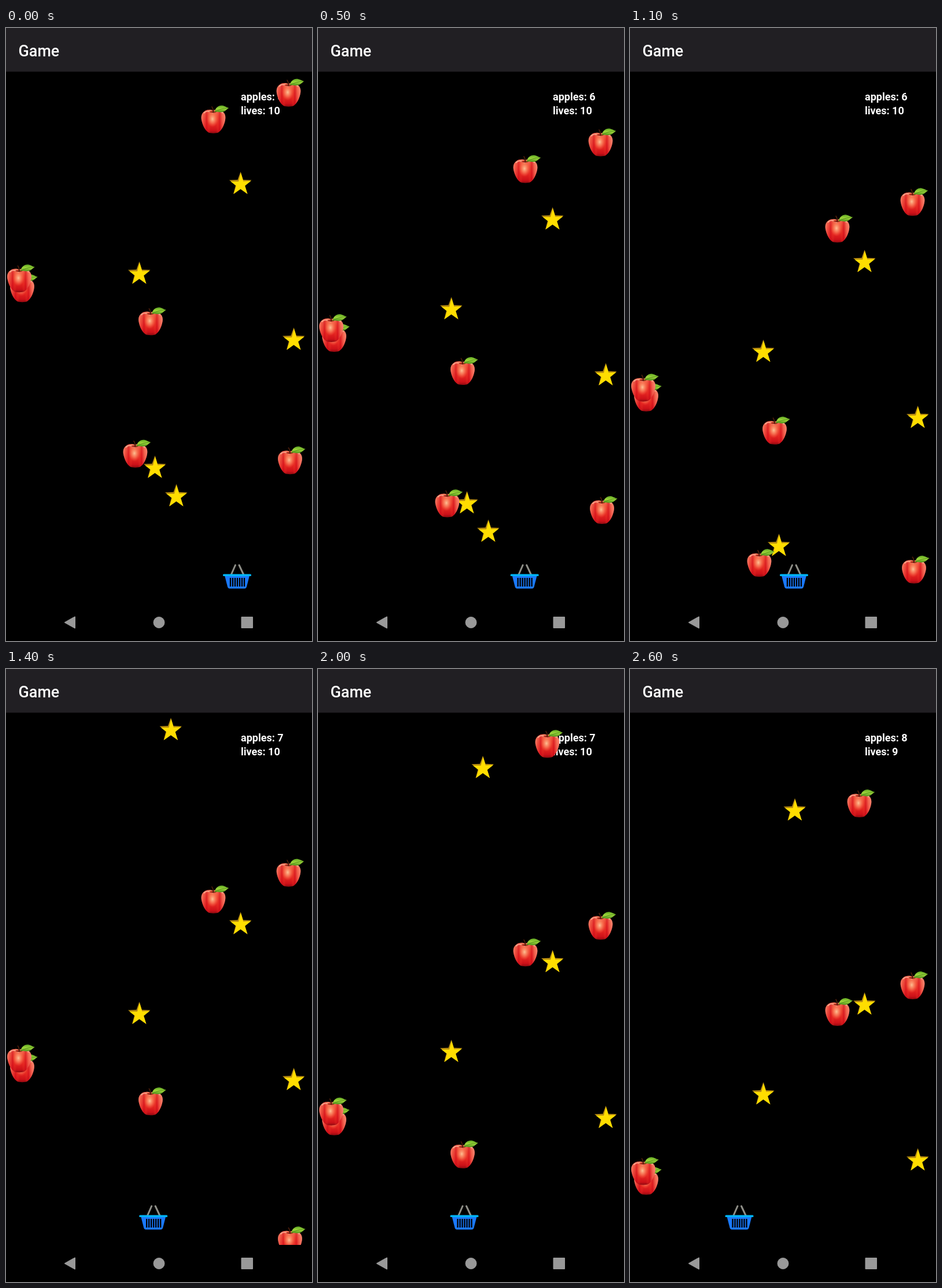
An HTML page that plays this animation: 529 px wide and 1058 px high, repeating every 2.7 s.

```html
<!DOCTYPE html>
<html lang="en">
<head>
<meta charset="utf-8">
<title>Game</title>
<style>
html, body { margin: 0; height: 100%; overflow: hidden; background: #000; }
svg { display: block; width: 100%; height: 100%; }
text { font-family: Roboto, sans-serif; fill: #fff; }
.title { font-size: 26.9px; font-weight: 500; }
.stat { font-size: 18px; font-weight: 700; }
</style>
</head>
<body>
<svg viewBox="0 0 529 1058">
  <defs>
    <clipPath id="field"><rect y="75" width="529" height="919"/></clipPath>
    <linearGradient id="skin" x2="0" y2="1">
      <stop offset="0" stop-color="#f47a5c"/>
      <stop offset=".3" stop-color="#ee4a36"/>
      <stop offset=".65" stop-color="#e32320"/>
      <stop offset=".88" stop-color="#cc1018"/>
      <stop offset="1" stop-color="#8e0a10"/>
    </linearGradient>
    <linearGradient id="sheen">
      <stop offset="0" stop-color="#ffb09a" stop-opacity=".5"/>
      <stop offset=".1" stop-color="#f06050" stop-opacity=".4"/>
      <stop offset=".22" stop-color="#d00818" stop-opacity=".6"/>
      <stop offset=".38" stop-color="#ff5030" stop-opacity="0"/>
      <stop offset=".62" stop-color="#ff5030" stop-opacity="0"/>
      <stop offset=".76" stop-color="#d00818" stop-opacity=".6"/>
      <stop offset=".88" stop-color="#f87860" stop-opacity=".6"/>
      <stop offset="1" stop-color="#ffb09a" stop-opacity=".6"/>
    </linearGradient>
    <radialGradient id="glow">
      <stop offset="0" stop-color="#ffd0a0" stop-opacity=".9"/>
      <stop offset=".5" stop-color="#ff9468" stop-opacity=".6"/>
      <stop offset="1" stop-color="#ff6a48" stop-opacity="0"/>
    </radialGradient>
    <linearGradient id="green" x2="0" y2="1">
      <stop offset="0" stop-color="#5fa822"/>
      <stop offset=".5" stop-color="#a0d63c"/>
      <stop offset="1" stop-color="#4b8f1a"/>
    </linearGradient>
    <path id="body" d="M21 9.500C17 7.500 11 7.500 6.500 10.500C1 14 -.5 20 1.500 28C3.500 36 7 43 12.500 47C15.500 49.300 27.500 49.300 30.500 47C36 43 39.500 36 41.500 28C43.500 20 42 14 36.500 10.500C32 7.500 25 7.500 21 9.500Z"/>
    <g id="apple">
      <use href="#body" fill="url(#skin)"/>
      <use href="#body" fill="url(#sheen)"/>
      <ellipse cx="20" cy="24" rx="10" ry="14" fill="url(#glow)"/>
      <path d="M5 14C9 9 15 10 20 13.500C26 10 33 9 38 14" fill="none" stroke="#ffc4a4" stroke-width="2.200" stroke-opacity=".7"/>
      <path d="M14 11.500Q21 16 28 11.500Q21 9 14 11.500Z" fill="#a8281a"/>
      <path d="M18.500 2.500Q21.500 6 21.300 13" fill="none" stroke="#4a1d0c" stroke-width="1.800"/>
      <path d="M23.500 12C25 4 31 0 37 .8C41 1.500 44 4 48 5C44 8 41 12 35 12.300C31 12.500 27 10.500 23.500 12Z" fill="url(#green)"/>
      <path d="M23.500 12Q33 6 47 5" fill="none" stroke="#3f8214" stroke-width=".8"/>
    </g>
    <g id="star">
      <path d="M19.500 0L24 14L38.500 14.500L27 23.500L31.500 38.500L19 29.500L7 38.500L11 23.500L0 14.500L14.500 14Z" fill="#b58a10"/>
      <path d="M20 2L24.300 16.500L37.500 16L27 24.500L31.500 38.500L19.500 30L7.500 38.500L12 24.500L2.500 17L16 17Z" fill="#ffdd00"/>
    </g>
  </defs>

  <rect width="529" height="75.400" fill="#211f23"/>
  <text class="title" x="21.500" y="48.500">Game</text>
  <text class="stat" x="406" y="124.500" id="apples"></text>
  <text class="stat" x="406" y="149" id="lives"></text>

  <g clip-path="url(#field)">
    <g id="items"></g>
    <g id="basket">
      <path d="M14.500 18L21.500 2M35.500 18L28 2" stroke="#8f8f88" stroke-width="3" stroke-linecap="round"/>
      <path d="M3 20H46L41 39.500Q40 42.500 37.500 42.500H11.500Q9 42.500 8 39.500Z" fill="#1a79fb"/>
      <rect y="17.500" width="49" height="3.500" rx="1.500" fill="#00b4f5"/>
      <path d="M13 24V39M17 24V39M21 24V39M25 24V39M29 24V39M33 24V39M37 24V39" stroke="#000" stroke-width="2.300"/>
    </g>
  </g>

  <g fill="#999" stroke="#999" stroke-linejoin="round">
    <path d="M102 1026L119 1016.500V1035.500Z" stroke-width="2"/>
    <circle cx="264.500" cy="1026" r="9.500"/>
    <rect x="407.500" y="1017" width="18.500" height="18" stroke-width="2"/>
  </g>
</svg>
<script>
const $ = id => document.getElementById(id);
const STEP = 100, STEPS = 27, TOP = 75;
const speed = { apple: 5.715, star: 4.08 };

// kind, x, start y, step at which the basket catches it
const items = [
  ['star', 386, 248], ['star', 211, 403], ['star', 478, 517],
  ['star', 238, 738, 13], ['star', 275, 787, 9], ['star', 265.5, -87],
  ['apple', 6.5, 424.5], ['apple', 1.5, 407.5], ['apple', 337, 133],
  ['apple', 467, 87], ['apple', 228.5, 481.5, 24], ['apple', 202, 710, 12],
  ['apple', 469.5, 721.5], ['apple', 375, -227]
].map(([kind, x, y, end = STEPS]) => {
  const el = document.createElementNS('http://www.w3.org/2000/svg', 'use');
  el.setAttribute('href', '#' + kind);
  $('items').append(el);
  return { el, kind, x, y, end };
});

// step, game ticks so far, basket x
const keys = [[0, 0, 375], [3, 10, 359], [8, 23, 293], [11, 33, 259],
  [16, 48, 211], [20, 58, 228.5], [26, 76, 164.5]];

function at(step, col) {
  const i = Math.max(1, keys.findIndex(k => k[0] >= step));
  const a = keys[i - 1], b = keys[i];
  return a[col] + (b[col] - a[col]) * (step - a[0]) / (b[0] - a[0]);
}

const place = (el, x, y) => el.setAttribute('transform', `translate(${x} ${y})`);

function draw(step) {
  const ticks = Math.round(at(step, 1));
  for (const { el, kind, x, y, end } of items) {
    const top = y + ticks * speed[kind];
    place(el, x, top);
    // new items appear whole at the top of the field
    el.style.display = top >= TOP && step < end ? '' : 'none';
  }
  place($('basket'), at(step, 2), 925);
  $('apples').textContent = 'apples: ' + (6 + (step >= 12) + (step >= 24));
  $('lives').textContent = 'lives: ' + (step >= 21 ? 9 : 10);
}

const start = performance.now();
function loop() {
  draw(Math.floor((performance.now() - start) / STEP) % STEPS);
  requestAnimationFrame(loop);
}
loop();
</script>
</body>
</html>
```
